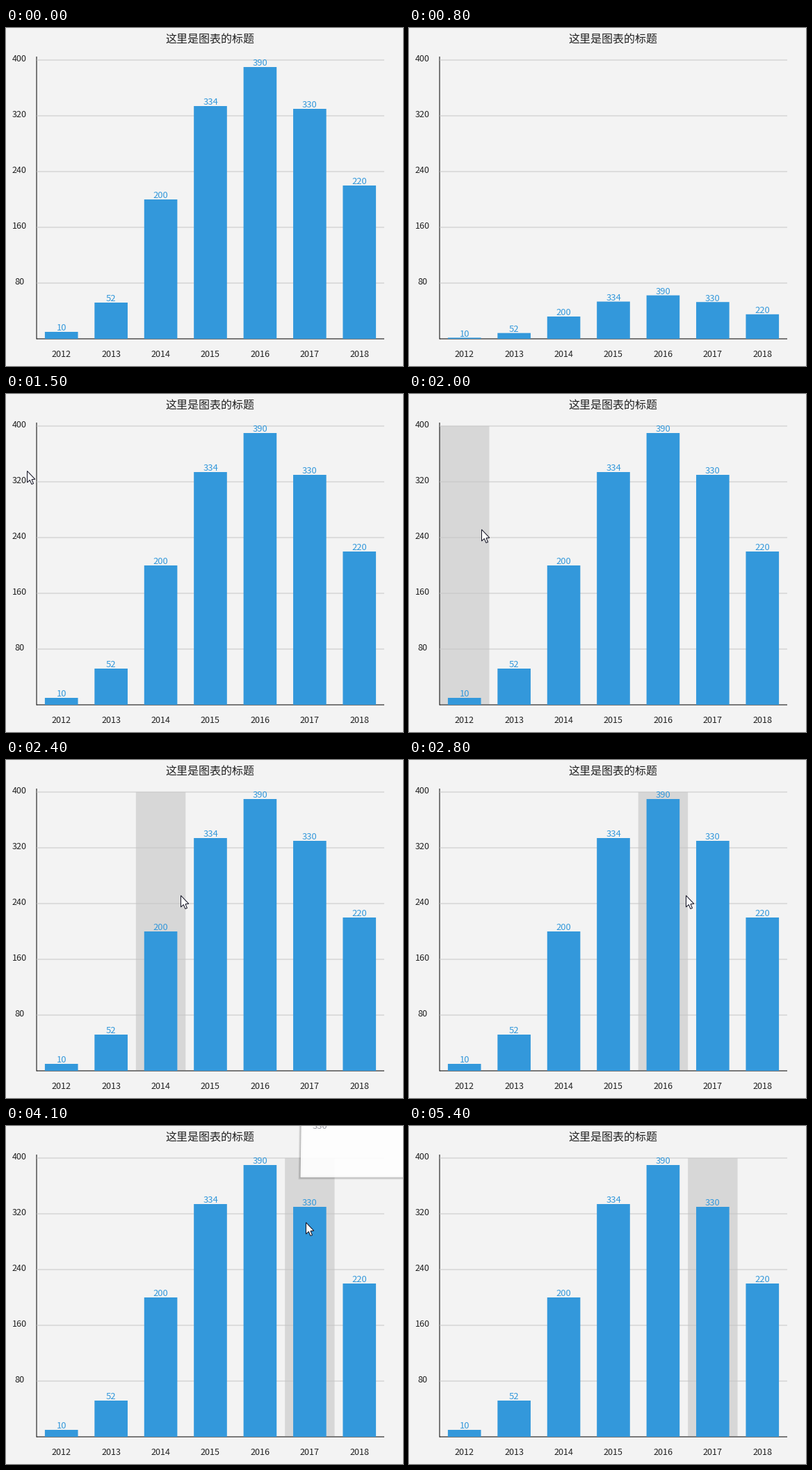
Recreate the animation shown at these times as a matplotlib script. Size 571 px wide and 485 px high, loop 6000 ms.

```python
import numpy as np
import matplotlib.pyplot as plt
from matplotlib.animation import FuncAnimation
from matplotlib.patches import Polygon, Rectangle

W, H, DPI = 571, 485, 64
PT = 72 / DPI  # points per pixel
FRAMES, STEP_MS = 60, 100

LEFT, RIGHT, TOP, BASE = 44, 544, 46, 446
BG, BLUE, INK = "#f3f3f3", "#3398db", "#222222"
VALUES = [10, 52, 200, 334, 390, 330, 220]
COL = (RIGHT - LEFT) / len(VALUES)
BAR = COL * 2 / 3

GROW_START = 8
CLICK, SELECTED = 39, 5
OPEN, CLOSE = 40, 54

# Pointer key points: frame, x, y
PATH = np.array([(13, 61, 4), (15, 30, 110), (20, 104, 194), (28, 398, 194),
                 (33, 543, 194), (36, 505, 14), (CLICK, 431, 138),
                 (44, 431, 138), (47, 549, 68)])
ARROW = np.array([(0, 0), (0, 16.5), (3.8, 13), (6.4, 19), (9, 18),
                  (6.5, 12.2), (11.3, 11.8)]) + 0.5

plt.rcParams["font.family"] = "Noto Sans CJK JP"
fig = plt.figure(figsize=(W / DPI, H / DPI), dpi=DPI, facecolor=BG)
ax = fig.add_axes([0, 0, 1, 1])
ax.set(xlim=(0, W), ylim=(H, 0))
ax.axis("off")


def line(x, y, color, z):
    ax.plot(x, y, color=color, lw=PT, zorder=z, snap=False,
            solid_capstyle="butt")


def text(x, y, s, size, color=INK, z=5, ha="center"):
    return ax.text(x, y, s, fontsize=size * PT, color=color, ha=ha,
                   va="baseline", zorder=z)


def rect(x, y, w, h, color, z):
    return ax.add_patch(Rectangle((x, y), w, h, fc=color, lw=0, zorder=z,
                                  snap=False))


def polygon(z, **style):
    return ax.add_patch(Polygon(np.zeros((4, 2)), closed=True, zorder=z,
                                snap=False, **style))


text(293.5, 21.5, "这里是图表的标题", 16)
line([LEFT, LEFT], [41, BASE + 0.5], "black", 2)
line([LEFT, RIGHT], [BASE, BASE], "black", 2)
for i in range(5):
    y = TOP + 80 * i
    line([LEFT, RIGHT], [y, y], "#c6c6c6", 3)
    text(19, y + 2, str(400 - 80 * i), 12.6)

hover = rect(LEFT, TOP, COL, BASE - 1 - TOP, "#d7d7d7", 1)
bars, labels = [], []
for i, v in enumerate(VALUES):
    mid = LEFT + COL * (i + 0.5)
    bars.append(rect(mid - BAR / 2, BASE, BAR, 0, BLUE, 4))
    labels.append(text(mid, BASE, str(v), 13, BLUE))
    text(mid, 471.5, str(2012 + i), 12.6)

shadows = [polygon(6, fc="none", ec="black", lw=2 * k * PT)
           for k in range(1, 4)]
dialog = polygon(7, fc="white", lw=0)
message = text(441, 0, str(VALUES[SELECTED]), 13, "#333344", 8, "left")
pointer = polygon(9, fc="white", ec="#111122", lw=PT, joinstyle="miter")


def grow(f):
    if f < GROW_START:
        return 1
    return min(1, 0.16 + 0.168 * (f - GROW_START))


def pointer_at(f):
    """Return the pointer tip, or None while it is off the stage."""
    times, xs, ys = PATH.T
    if not times[0] <= f <= times[-1]:
        return None
    return np.round([np.interp(f, times, xs), np.interp(f, times, ys)])


def hovered(f, pos):
    if f >= CLICK:
        return SELECTED
    if pos is None:
        return None
    x, y = pos
    if LEFT <= x < RIGHT and TOP <= y <= BASE:
        return int((x - LEFT) / COL)
    return None


def draw_dialog(f):
    """Fade the dialog in and out while it slides and straightens."""
    shown = np.clip(min(0.7 * (f - OPEN), 0.5 * (CLOSE - f)), 0, 1)
    left, bottom = 423.5, 59 + 21 * shown
    lean = 4 * (1 - shown)
    outline = [(left + lean, -10), (left, bottom),
               (W + 10, bottom), (W + 10, -10)]
    for part in (*shadows, dialog):
        part.set_xy(outline)
    for shadow in shadows:
        shadow.set_alpha(0.12 * shown)
    dialog.set_alpha(1 - (1 - shown) ** 2)
    message.set_alpha(shown ** 2)
    message.set_y(6 - 8 * (1 - shown))


def update(f):
    for v, bar, label in zip(VALUES, bars, labels):
        height = v * grow(f)
        bar.set_y(BASE - height)
        bar.set_height(height)
        label.set_y(BASE - height - 1.5)

    pos = pointer_at(f)
    pointer.set_visible(pos is not None)
    if pos is not None:
        pointer.set_xy(ARROW + pos)

    col = hovered(f, pos)
    hover.set_visible(col is not None)
    if col is not None:
        hover.set_x(LEFT + COL * col)

    draw_dialog(f)
    return []


anim = FuncAnimation(fig, update, frames=FRAMES, interval=STEP_MS,
                     repeat=True, repeat_delay=0, blit=False)
plt.show()
```
